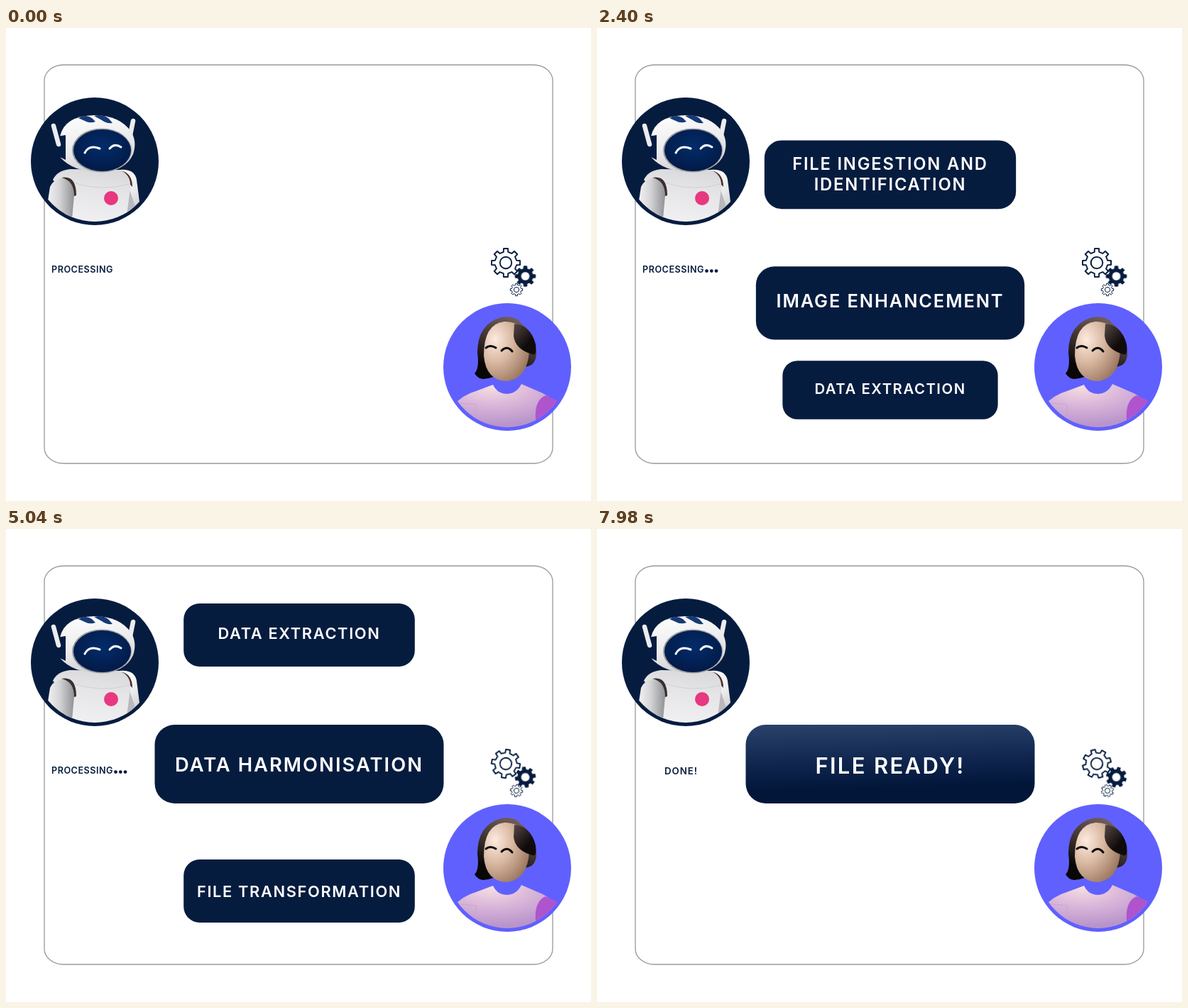
An HTML page that plays this animation: 824 px wide and 667 px high, repeating every 8 s.

```html
<!DOCTYPE html>
<html lang="en">
<head>
<meta charset="utf-8">
<title>File processing</title>
<style>
  html, body { margin: 0; width: 100%; height: 100%; overflow: hidden; background: #fff; }
  svg { display: block; width: 824px; height: 667px; }
  text { font: 600 27.3px Inter, "Open Sans", sans-serif; letter-spacing: .075em; }
  .card text { fill: #fff; text-anchor: middle; }
  .card rect { fill: #061c3f; }
  .card.shiny rect { fill: url(#shine); }
  .card.shiny text { font-size: 31px; }
  .label { fill: #061c3f; font-size: 12.6px; letter-spacing: .042em; }
  #done { font-size: 13.3px; letter-spacing: .07em; }
  #dots { fill: #061c3f; }
  .line { fill: none; stroke-linecap: round; stroke-linejoin: round; }
  .gear { animation: spin 9.6s linear infinite; }
  .gear.back { animation-direction: reverse; }
  @keyframes spin { to { transform: rotate(360deg); } }
</style>
</head>
<body>
<svg viewBox="0 0 824 667">
  <defs>
    <linearGradient id="shine" x1=".45" y1="0" x2=".55" y2="1">
      <stop offset="0" stop-color="#284068"/><stop offset=".45" stop-color="#10264f"/><stop offset=".8" stop-color="#02163a"/>
    </linearGradient>
    <linearGradient id="shell" x1="0" y1="0" x2=".3" y2="1">
      <stop offset="0" stop-color="#fff"/><stop offset=".6" stop-color="#ececee"/><stop offset="1" stop-color="#d2d2d5"/>
    </linearGradient>
    <linearGradient id="torso" x1=".6" y1="0" x2=".4" y2="1">
      <stop offset="0" stop-color="#d9d9dc"/><stop offset=".35" stop-color="#e5e5e7"/><stop offset="1" stop-color="#f2f2f4"/>
    </linearGradient>
    <linearGradient id="arm">
      <stop offset="0" stop-color="#f3f3f4"/><stop offset=".45" stop-color="#d5d5d7"/><stop offset="1" stop-color="#8f9195"/>
    </linearGradient>
    <radialGradient id="visor" cx=".5" cy=".4" r=".6">
      <stop offset="0" stop-color="#032c6b"/><stop offset="1" stop-color="#021a47"/>
    </radialGradient>
    <radialGradient id="skin" cx=".25" cy=".3" r=".85">
      <stop offset="0" stop-color="#fdeadf"/><stop offset=".45" stop-color="#d9b9a2"/><stop offset="1" stop-color="#96715a"/>
    </radialGradient>
    <linearGradient id="hair" x1=".7" y1="0" x2=".3" y2="1">
      <stop offset="0" stop-color="#75625f"/><stop offset=".45" stop-color="#40342f"/><stop offset=".85" stop-color="#090606"/>
    </linearGradient>
    <linearGradient id="fringe" x1="0" y1="0" x2=".8" y2="1">
      <stop offset="0" stop-color="#574946"/><stop offset=".7" stop-color="#100b0b"/>
    </linearGradient>
    <radialGradient id="shirt" cx=".36" cy=".05" r=".8">
      <stop offset="0" stop-color="#f5dfe2"/><stop offset=".45" stop-color="#dcb9da"/><stop offset="1" stop-color="#b994cb"/>
    </radialGradient>
    <clipPath id="robotClip"><circle cx="125" cy="188" r="85"/></clipPath>
    <clipPath id="womanClip"><circle cx="706" cy="478" r="85"/></clipPath>
  </defs>

  <rect x="54" y="52" width="716" height="562" rx="27" ry="22" fill="#fff" stroke="#999" stroke-width="1.3"/>

  <g id="cards"></g>

  <g id="robot">
    <circle cx="125" cy="188" r="90" fill="#061c3f"/>
    <g clip-path="url(#robotClip)">
      <path d="M160 200Q181 198 184 214L190 260L160 262Z" fill="url(#shell)"/>
      <path d="M161 201Q178 204 178 224L170 216Z" fill="#4b2f2c"/>
      <path d="M172 222L184 258L168 262Z" fill="#b9b9bd"/>
      <path d="M66 214Q72 201 90 199L160 200Q177 207 175 226L168 280H84L80 230Z" fill="url(#torso)"/>
      <path d="M98 219Q136 231 174 220" class="line" stroke="#d0d0d3"/>
      <path d="M58 250L62 224Q68 211 83 212Q97 218 96 236L92 280H58Z" fill="url(#arm)"/>
      <path d="M78 211Q99 207 99 236L96 237Q96 215 78 211Z" fill="#3a302d"/>
    </g>
    <path d="M76 153Q82 124 124 123Q160 123 176 146Q185 160 179 178Q168 203 130 203Q94 202 77 183Z" fill="url(#shell)"/>
    <path d="M71 153L84 151V186L74 181Q69 166 71 153Z" fill="#041c42"/>
    <path d="M102 127Q112 121 121 127L126 132Q118 135 111 131ZM124 124Q137 121 145 128L150 134Q141 135 135 130Z" fill="#153a76"/>
    <path d="M67 138L74 164M179 131L175 151" class="line" stroke="#ececef" stroke-width="6.5"/>
    <ellipse cx="135" cy="172.500" rx="42" ry="31" fill="#9a9da2"/>
    <ellipse cx="135.500" cy="172.500" rx="40.500" ry="29.500" fill="url(#visor)"/>
    <path d="M111 176Q117 164 132 170M146 170Q153 162 162 168" class="line" stroke="#fff" stroke-width="3"/>
    <circle cx="148" cy="240" r="10" fill="#e8387f"/>
  </g>

  <g id="woman">
    <circle cx="706" cy="478" r="90" fill="#6060ff"/>
    <g clip-path="url(#womanClip)">
      <path d="M630 532Q644 517 662 512L686 503Q692 516 706 516Q720 515 726 502L756 515Q770 522 780 535V570H630Z" fill="url(#shirt)"/>
      <path d="M746 552Q744 525 760 518L778 526V560L746 558Z" fill="#ae55ce"/>
      <path d="M638 529L662 531V549" class="line" stroke="#c9a4d2"/>
    </g>
    <path d="M660 487Q667 480 664 458Q664 417 698 408Q718 405 725 416Q745 430 747 458Q747 474 735 477L700 484Q688 494 672 495Q664 494 660 487Z" fill="url(#hair)"/>
    <path d="M673 462Q673 417 702 414Q734 413 737 455Q735 493 707 498Q676 498 673 462Z" fill="url(#skin)"/>
    <path d="M716 417Q739 419 746 446Q748 463 741 460Q717 453 715 434Z" fill="url(#fringe)"/>
    <path d="M676 451Q682 446 690 451M698 455Q706 447 713 456" class="line" stroke="#0b0707" stroke-width="3"/>
  </g>

  <text id="busy" class="label" x="64" y="345">PROCESSING</text>
  <text id="done" class="label" x="95" y="345.500">DONE!</text>
  <g id="dots"></g>
  <g id="gears" stroke="#061c3f"></g>
</svg>
<script>
const LOOP = 8000;
const TOP = 149.5, MIDDLE = 331.5, BOTTOM = 510.5;
const byId = id => document.getElementById(id);

function add(parent, tag, attrs, content) {
  const node = document.createElementNS('http://www.w3.org/2000/svg', tag);
  for (const key in attrs) node.setAttribute(key, attrs[key]);
  if (content) node.textContent = content;
  return parent.appendChild(node);
}

// Exponential ease in and out, half way at time `mid`.
function ease(t, mid) {
  const d = (t - mid) / 30;
  if (d <= -10) return 0;
  if (d >= 10) return 1;
  return d < 0 ? 2 ** d / 2 : 1 - 2 ** -d / 2;
}

// grow, shrink, toMiddle, toTop: midpoints of the transitions in ms
const cards = [
  { lines: ['FILE RECEIVED!'], shiny: true, dy: 3, grow: 300, shrink: 1030 },
  { lines: ['FILE INGESTION AND', 'IDENTIFICATION'], dy: -1.5, grow: 1242, toTop: 2381, shrink: 3525 },
  { lines: ['IMAGE ENHANCEMENT'], dy: -3, grow: 1250, toMiddle: 2381, toTop: 3500, shrink: 4653 },
  { lines: ['DATA EXTRACTION'], dy: -3, grow: 2315, toMiddle: 3500, toTop: 4633, shrink: 5786 },
  { lines: ['DATA HARMONISATION'], dy: 0, grow: 3430, toMiddle: 4633, toTop: 5766, shrink: 6900 },
  { lines: ['FILE TRANSFORMATION'], dy: 0, grow: 4565, toMiddle: 5766, shrink: 6900 },
  { lines: ['FILE READY!'], shiny: true, dy: 2.5, grow: 7010 },
];

for (const card of cards) {
  const { lines, dy, shiny } = card;
  card.node = add(byId('cards'), 'g', { class: shiny ? 'card shiny' : 'card' });
  add(card.node, 'rect', { x: -203.5, y: -55.5, width: 407, height: 111, rx: 28 });
  lines.forEach((line, i) => add(card.node, 'text',
    { x: 0, y: dy + (shiny ? 11 : 10) + (i - (lines.length - 1) / 2) * 33 }, line));
}

function drawCard({ node, grow, shrink = Infinity, toMiddle, toTop = Infinity }, t) {
  const up = toMiddle ? ease(t, toMiddle) : 1;
  const out = ease(t, toTop);
  const y = BOTTOM + (MIDDLE - BOTTOM) * up + (TOP - MIDDLE) * out;
  const size = 0.8 + 0.2 * (up ** 1.15 - out ** 1.15);
  const scale = size * ease(t, grow) * (1 - ease(t, shrink));
  node.setAttribute('transform', `translate(413 ${y}) scale(${scale})`);
  node.style.display = scale > 0.001 ? '' : 'none';
}

const dots = [154.5, 161.3, 168].map(cx => add(byId('dots'), 'circle', { cx, r: 2.4 }));

function drawDots(t, busy) {
  dots.forEach((dot, i) => {
    const phase = ((t - 440 - i * 150 + 2760) % 2760) / 1650;
    const lift = phase < 1 ? 2.5 * Math.sin(phase * Math.PI) ** 4 : 0;
    dot.setAttribute('cy', 342.6 - lift);
    dot.style.display = busy && t >= 60 + i * 140 ? '' : 'none';
  });
}

function gearPath(outer, root) {
  const points = [];
  for (let i = 0; i < 8; i++) {
    for (const [radius, turn] of [[root, -.27], [outer, -.19], [outer, .19], [root, .27]]) {
      const a = (i + turn) * Math.PI / 4;
      points.push(`${(radius * Math.sin(a)).toFixed(2)} ${(-radius * Math.cos(a)).toFixed(2)}`);
    }
  }
  return `M${points.join('L')}Z`;
}

function addGear(x, y, outer, root, hole, width, fill, back) {
  const place = add(byId('gears'), 'g', { transform: `translate(${x} ${y})`, 'stroke-width': width });
  const gear = add(place, 'g', { class: back ? 'gear back' : 'gear' });
  add(gear, 'path', { d: gearPath(outer, root), fill, 'stroke-linejoin': 'round' });
  add(gear, 'circle', { r: hole, fill: '#fff' });
}
addGear(704, 331, 20.2, 15.5, 8.2, 1.9, '#fff');
addGear(731.5, 350, 14.3, 10.8, 6.3, 1, '#061c3f', true);
addGear(719, 369, 8.8, 6.8, 3.6, 1, '#fff');

const start = performance.now();
function draw(now) {
  const t = Math.max(0, now - start) % LOOP;
  const busy = t < 6900;
  cards.forEach(card => drawCard(card, t));
  drawDots(t, busy);
  byId('busy').style.display = busy ? '' : 'none';
  byId('done').style.display = busy ? 'none' : '';
  requestAnimationFrame(draw);
}
draw(start);
</script>
</body>
</html>
```
